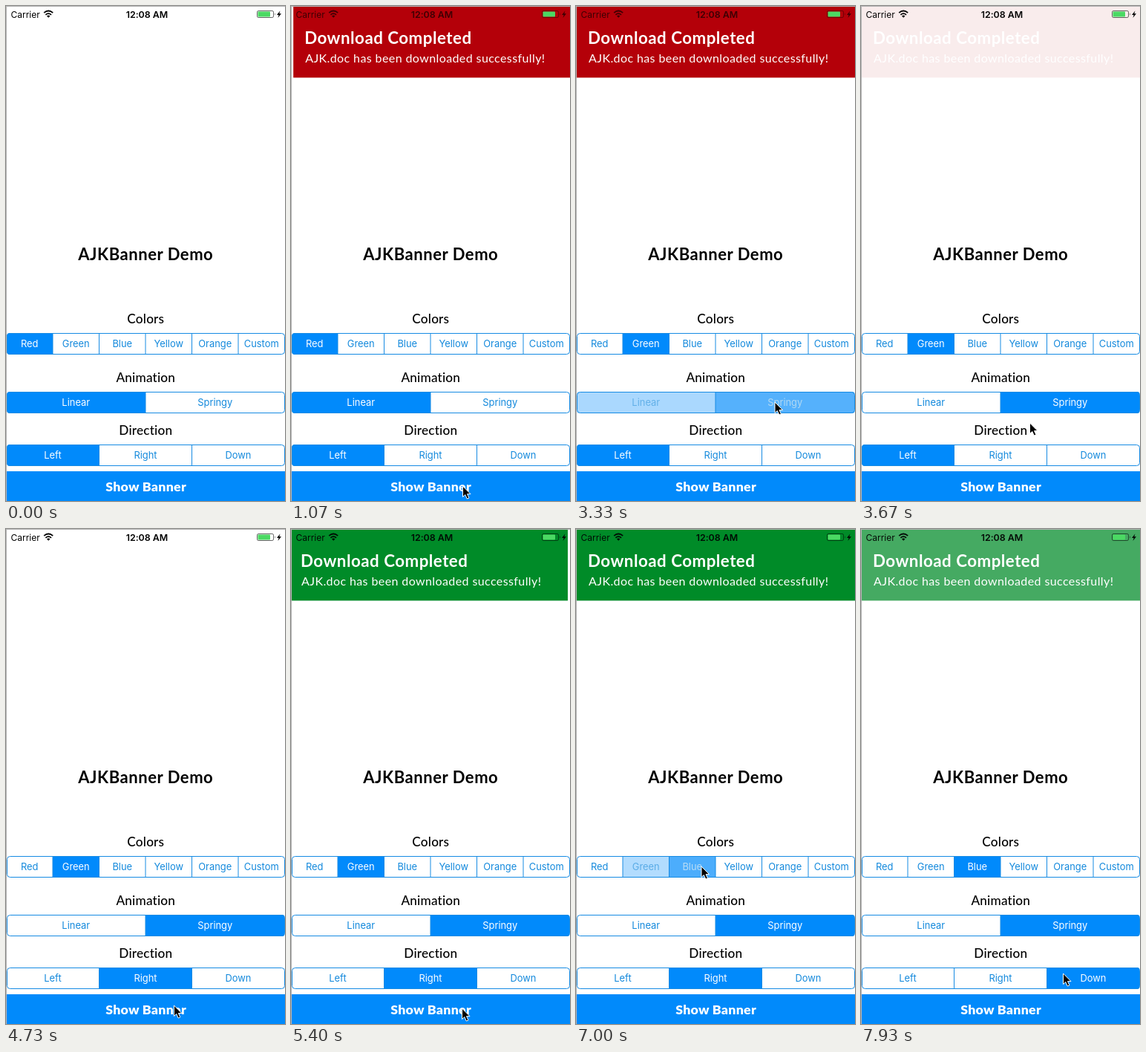
An HTML page that plays this animation: 376x666 px, repeating every 8 s.

```html
<!DOCTYPE html>
<html lang="en">
<head>
<meta charset="utf-8">
<title>Banner demo</title>
<style>
  html, body { margin: 0; width: 100%; height: 100%; overflow: hidden; background: #fff; }
  svg { display: block; width: 100vw; height: 100vh; }
  text { font-family: Lato, "Open Sans", sans-serif; font-variant-ligatures: none; }
  .mid { text-anchor: middle; }
  .heading { font-size: 22px; font-weight: 700; letter-spacing: .55px; }
  .label { font-size: 17.2px; font-weight: 500; letter-spacing: .2px; }
  .action { font-size: 17.8px; font-weight: 900; letter-spacing: .25px; fill: #fff; }
  .seg, #status text { font-family: Inter, Roboto, sans-serif; }
  .seg { font-size: 12.9px; }
  #status text { font-size: 12px; }
  #status .clock { font-size: 12.4px; font-weight: 600; }
  #banner text { fill: #fff; }
  #banner .title { font-size: 22.3px; font-weight: 700; letter-spacing: .5px; }
  #banner .note { font-size: 16px; letter-spacing: .4px; }
  .line { fill: none; stroke: #168be3; }
</style>
</head>
<body>
<svg id="stage" viewBox="0 0 376 666">
  <rect width="376" height="666" fill="#fff"/>
  <text class="mid heading" x="188.3" y="342">AJKBanner Demo</text>
  <g id="controls"></g>
  <rect x="0" y="626" width="376" height="40" fill="#018afb"/>
  <text id="action" class="mid action" x="188.6" y="653">Show Banner</text>

  <g id="banner">
    <rect x="1" y="0" width="375" height="96.4"/>
    <text class="title" x="16" y="51">Download Completed</text>
    <text class="note" x="17" y="76.3">AJK.doc has been downloaded successfully!</text>
  </g>

  <g id="status">
    <text x="6.5" y="15.5">Carrier</text>
    <g fill="none" stroke="#000" stroke-width="1.8">
      <path d="M51.2 9.2Q57.2 3.8 63.2 9.2"/>
      <path d="M53.4 11.8Q57.2 8.4 61 11.8"/>
    </g>
    <path d="M55 13.4Q57.2 11.6 59.4 13.4L57.2 15.8Z"/>
    <text class="mid clock" x="190" y="15.5">12:08 AM</text>
    <path d="M369.4 6.5L365 12H367.6L366.4 16L371 10.2H368.3Z"/>
    <rect x="338.5" y="6.5" width="22" height="9" rx="1.8" fill="none" stroke="#000" stroke-opacity=".6"/>
    <path d="M362 9.3Q363.8 11 362 12.7Z" fill-opacity=".6"/>
  </g>
  <rect x="339.5" y="7.5" width="16.5" height="7" rx=".8" fill="#4bd963"/>

  <path d="M0 0H376V1H1V666H0Z" fill="#b4b4b4"/>
  <path id="cursor" d="M0 0V14.5L3.3 11.5L5.8 17L8.4 15.9L6 10.6H10.5Z" fill="#000" stroke="#fff" stroke-width="1" stroke-linejoin="round"/>
</svg>

<script>
const LOOP = 8000, FPS = 15, SEGMENT_FADE = 200, BANNER_FADE = 300;
const BLUE = [1, 138, 251], INK = [19, 137, 220], WHITE = [255, 255, 255];

const rows = [
  { title: 'Colors', y: 440, names: ['Red', 'Green', 'Blue', 'Yellow', 'Orange', 'Custom'],
    picks: [[2460, 1], [6860, 2]] },
  { title: 'Animation', y: 519, names: ['Linear', 'Springy'], picks: [[3200, 1]] },
  { title: 'Direction', y: 590, names: ['Left', 'Right', 'Down'], picks: [[4150, 1], [7680, 2]] }
];

const banners = [
  { start: 780, leave: 3415, color: '#b40009', dim: .35, shift: s => 375 * (1 - smooth(s / .3)) },
  { start: 5130, leave: 7830, color: '#008b28', dim: .1, shift: s => -375 * spring(s) }
];

const presses = [[640, 800], [4960, 5100]];

// time, x, y of the pointer tip
const route = [
  [130, 318, 664], [560, 231.5, 646], [1660, 231.5, 646], [2400, 107.5, 448],
  [2600, 107.5, 448], [3100, 268, 533], [3340, 268, 533], [3670, 227.5, 561],
  [4020, 187, 602], [4280, 187, 602], [4840, 230.5, 645], [6180, 230.5, 645],
  [6780, 169, 454], [7030, 169, 454], [7600, 272.5, 598], [8000, 272.5, 598]
];

const $ = id => document.getElementById(id);
const clamp = v => Math.min(1, Math.max(0, v));
const lerp = (a, b, p) => a + (b - a) * p;
const mix = (a, b, p) => `rgb(${a.map((v, i) => Math.round(lerp(v, b[i], p)))})`;

function smooth(v) {
  const p = clamp(v);
  return p * p * (3 - 2 * p);
}

function spring(s) {
  const decay = 15, turn = 8.8;
  return Math.exp(-decay * s) * (Math.cos(turn * s) + decay / turn * Math.sin(turn * s));
}

function add(parent, tag, attrs, text = '') {
  const node = document.createElementNS('http://www.w3.org/2000/svg', tag);
  for (const key in attrs) node.setAttribute(key, attrs[key]);
  node.textContent = text;
  return parent.appendChild(node);
}

function buildRow(row, index) {
  const g = $('controls'), { y, names } = row, step = 375 / names.length;
  const edge = i => i * step + .5;
  add(g, 'text', { class: 'mid label', x: 188.3, y: y - 13 }, row.title);
  add(add(g, 'clipPath', { id: 'clip' + index }), 'rect', { x: 1, y, width: 375, height: 29, rx: 4 });
  const fills = add(g, 'g', { 'clip-path': `url(#clip${index})` });
  row.cells = names.map((name, i) => ({
    fill: add(fills, 'rect', { x: edge(i), y, width: step, height: 29, fill: mix(BLUE, BLUE, 0) }),
    label: add(g, 'text', { class: 'mid seg', x: edge(i + .5), y: y + 19 }, name)
  }));
  for (let i = 1; i < names.length; i++) {
    add(g, 'path', { class: 'line', d: `M${edge(i)} ${y}v29` });
  }
  add(g, 'rect', { class: 'line', x: 1.5, y: y + .5, width: 374, height: 28, rx: 4 });
}

function drawRow(row, t) {
  const level = row.names.map((_, i) => i ? 0 : 1);
  for (const [time, pick] of row.picks) {
    const p = clamp((t - time) / SEGMENT_FADE);
    level.forEach((v, i) => level[i] = lerp(v, i === pick ? 1 : 0, p));
  }
  row.cells.forEach(({ fill, label }, i) => {
    fill.setAttribute('fill-opacity', level[i]);
    label.setAttribute('fill', mix(INK, WHITE, level[i]));
  });
}

function drawBanner(t) {
  const b = banners.find(b => t >= b.start && t < b.leave + BANNER_FADE);
  $('banner').style.display = b ? '' : 'none';
  $('status').setAttribute('opacity', 1);
  if (!b) return;
  const shift = b.shift((t - b.start) / 1000);
  const alpha = 1 - smooth((t - b.leave) / BANNER_FADE);
  $('banner').setAttribute('transform', `translate(${shift.toFixed(2)} 0)`);
  $('banner').setAttribute('opacity', alpha);
  $('banner').setAttribute('fill', b.color);
  $('status').setAttribute('opacity', 1 - b.dim * alpha * clamp(1 - Math.abs(shift) / 375));
}

function drawAction(t) {
  let alpha = 1;
  for (const [down, up] of presses) {
    if (t >= down) alpha = lerp(.2, 1, 1 - (1 - clamp((t - up) / 350)) ** 2);
  }
  $('action').setAttribute('fill-opacity', alpha);
}

function drawCursor(t) {
  const visible = t >= route[0][0];
  $('cursor').style.display = visible ? '' : 'none';
  if (!visible) return;
  const i = route.findIndex(stop => t < stop[0]);
  const [t0, x0, y0] = route[i - 1], [t1, x1, y1] = route[i];
  const p = smooth((t - t0) / (t1 - t0));
  $('cursor').setAttribute('transform', `translate(${lerp(x0, x1, p)} ${lerp(y0, y1, p)})`);
}

const origin = performance.now();
function render() {
  const elapsed = (performance.now() - origin) % LOOP;
  // Motion advances at 15 frames per second; the margin absorbs rounded frame times.
  const t = Math.floor((elapsed + 4) * FPS / 1000) * 1000 / FPS % LOOP;
  rows.forEach(row => drawRow(row, t));
  drawBanner(t);
  drawAction(t);
  drawCursor(t);
  requestAnimationFrame(render);
}

rows.forEach(buildRow);
render();
</script>
</body>
</html>
```
